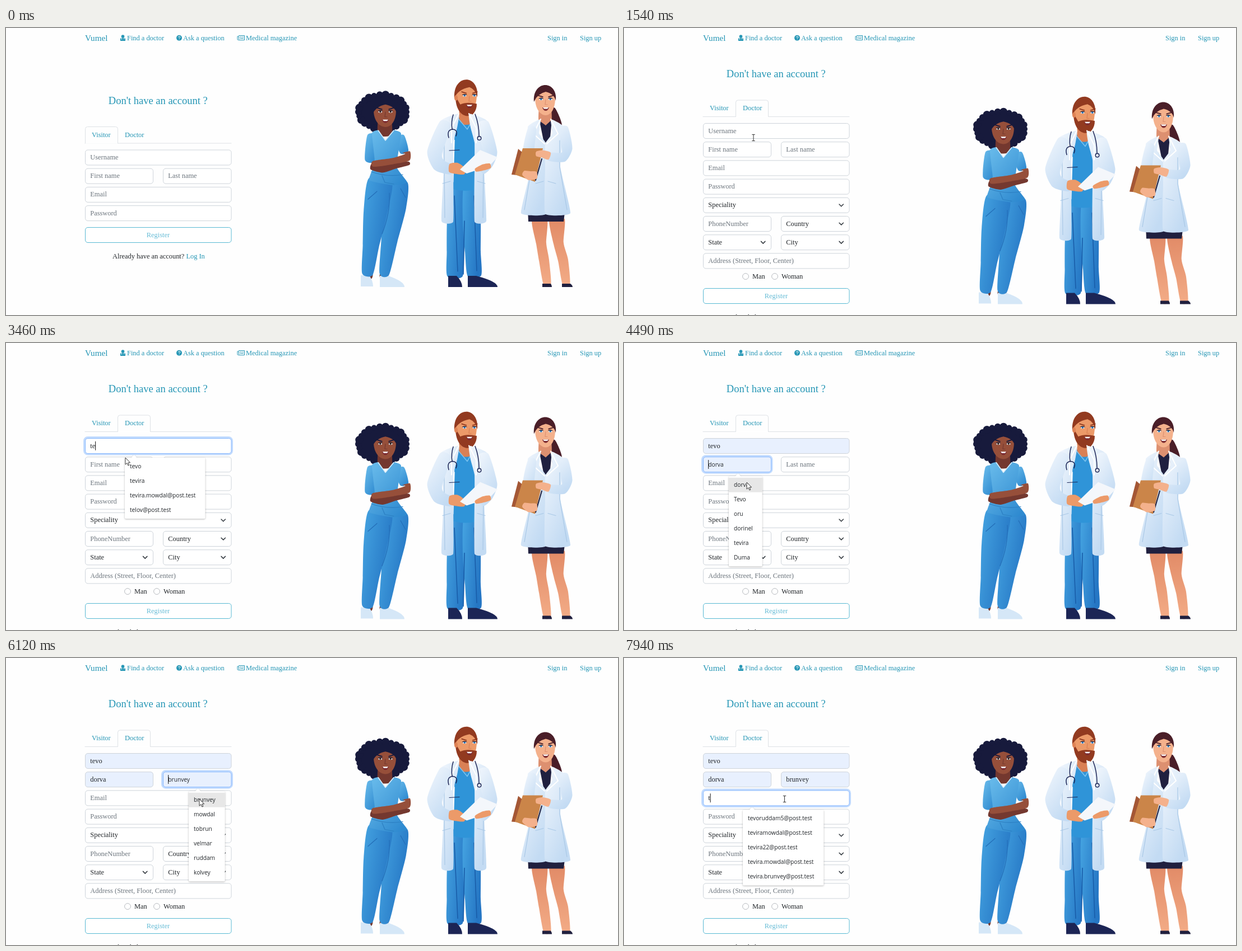
Animation of 1092 by 513 pixels, one loop 8000 ms. Source, as an HTML page:

```html
<!DOCTYPE html>
<html lang="en">
<head>
<meta charset="utf-8">
<title>Sign up</title>
<style>
html, body { margin: 0; width: 100%; height: 100%; overflow: hidden; background: #fefefe; }
svg { display: block; width: 1092px; height: 513px; }
text { font: 12.4px "Liberation Serif", serif; fill: #212529; white-space: pre; }
.teal text, text.teal { fill: #2596b5; }
text.hint { fill: #6c757d; }
text.sans { font: 10.2px "Open Sans", sans-serif; }
.mid { text-anchor: middle; }
.line { fill: none; stroke-linecap: round; stroke-linejoin: round; }
</style>
</head>
<body>
<svg viewBox="0 0 1092 513">
  <defs>
    <linearGradient id="scrub" x2=".8" y2="1"><stop stop-color="#6bbdec"/><stop offset="1" stop-color="#2f8ad0"/></linearGradient>
    <linearGradient id="legs" x2="1" y2=".5"><stop stop-color="#46a5e2"/><stop offset="1" stop-color="#2576c4"/></linearGradient>
    <linearGradient id="coat" x2=".6" y2="1"><stop stop-color="#f2f7fd"/><stop offset="1" stop-color="#c3dbf3"/></linearGradient>
    <linearGradient id="calf" x2="0" y2="1"><stop stop-color="#e18a66"/><stop offset="1" stop-color="#f3ac87"/></linearGradient>
  </defs>
  <g class="teal">
    <text x="141" y="23" style="font-size:15.2px">Vumel</text>
    <text x="216" y="22">Find a doctor</text>
    <text x="316" y="22">Ask a question</text>
    <text x="428" y="22">Medical magazine</text>
    <text x="966" y="22">Sign in</text>
    <text x="1024" y="22">Sign up</text>
    <path fill="#2596b5" d="M204 23v-3q0-2.500 3-2.500h3q3 0 3 2.500v3z"/>
    <circle cx="208.500" cy="15" r="2.800" fill="#2596b5"/>
    <circle cx="309" cy="17.700" r="5" fill="#2596b5"/>
    <path class="line" stroke="#fff" d="M206.600 18v2.500M210.700 18v2M307.300 16.400q.3-1.500 1.800-1.500 1.800 0 1.800 1.500 0 1-1.800 1.800v.5M309.100 20.800v.1"/>
    <path class="line" stroke="#2596b5" d="M415.500 13.500h10v8h-11q-1.500 0-1.500-1.500v-5h2.500v5M418 16h2M422 16h1.500M418 18.500h5.500"/>
  </g>
  <g id="people"></g>
  <g id="form">
    <text class="teal mid" x="271.300" y="88" style="font-size:18.500px">Don't have an account ?</text>
    <path class="line" stroke="#dee2e6" d="M141 158.500H402"/>
    <g id="tab">
      <path fill="#fefefe" stroke="#dee2e6" d="M0 158.500V133q0-4 4-4h50q4 0 4 4V158.500"/>
      <path stroke="#fefefe" stroke-width="1.500" d="M.5 158.500h57"/>
    </g>
    <g class="teal"><text x="153" y="147">Visitor</text><text x="212" y="147">Doctor</text></g>
    <g id="pane">
      <g id="base"></g>
      <g id="extra"></g>
      <g id="submit">
        <rect x="141.500" y=".5" width="260.500" height="27" rx="4.500" fill="#fff" stroke="#58b9d3"/>
        <text class="mid" x="271.500" y="17.500" style="fill:#67bcd6">Register</text>
        <text x="190" y="56">Already have an account? <tspan fill="#2596b5">Log In</tspan></text>
      </g>
    </g>
    <path id="wavy" class="line" stroke="#e0403a" stroke-width=".9"/>
    <rect id="caret" width="1" height="16" fill="#111"/>
  </g>
  <g id="menus"></g>
  <circle id="click" r="8.800" fill="#f6f21c" opacity=".72"/>
  <g id="cursor">
    <path id="arrow" d="M0 0V12.200L2.900 9.600 4.900 14 6.800 13.200 4.900 8.900H8.600Z" fill="#fff" stroke="#222" stroke-width=".9"/>
    <path id="beam" class="line" d="M-2.300-5.600H2.300M0-5.600V5.600M-2.300 5.600H2.300" stroke="#333"/>
    <path id="hand" d="M-1.500 0Q0-1.500 1.200 0V4.500L6 5.500Q8 6 7.700 8L6.800 12.500H.5L-3.800 7.500Q-3.500 5.500-1.500 7Z" fill="#fff" stroke="#222" stroke-width=".9"/>
  </g>
</svg>
<script>
const $ = id => document.getElementById(id);
const LOOP = 8000, NEVER = 9000, BLINK = 535;

function add(parent, tag, attrs, text) {
  const node = document.createElementNS('http://www.w3.org/2000/svg', tag);
  for (const k in attrs) node.setAttribute(k, attrs[k]);
  if (text) node.textContent = text;
  parent.appendChild(node);
  return node;
}
const show = (node, on) => { node.style.display = on ? '' : 'none'; };
const move = (node, x, y) => node.setAttribute('transform', `translate(${x} ${y})`);
const ramp = (t, a, b) => Math.min(1, Math.max(0, (t - a) / (b - a)));

// ---------- people ----------
const people = $('people');
const path = (fill, d) => add(people, 'path', { d, fill });
const line = (stroke, d, w = 1.2) => add(people, 'path', { d, class: 'line', stroke, 'stroke-width': w });
const oval = (fill, cx, cy, rx, ry = rx) => add(people, 'ellipse', { fill, cx, cy, rx, ry });
const both = draw => [-1, 1].forEach(draw);

// Smooth closed outline through a few points.
function shape(fill, p, k = .7) {
  const n = p.length, at = i => p[(i + n) % n];
  let d = 'M' + p[0];
  for (let i = 0; i < n; i++) {
    const a = at(i - 1), b = at(i), c = at(i + 1), e = at(i + 2);
    const out = b.map((v, j) => v + (c[j] - a[j]) * k / 6);
    const into = c.map((v, j) => v - (e[j] - b[j]) * k / 6);
    d += `C${out} ${into} ${c}`;
  }
  path(fill, d + 'Z');
}

// Tapered limb; each joint is x, y, width.
function limb(fill, ...joints) {
  const side = s => joints.map(([x, y, w], i) => {
    const a = joints[Math.max(0, i - 1)], b = joints[Math.min(joints.length - 1, i + 1)];
    const dx = b[0] - a[0], dy = b[1] - a[1], r = s * w / 2 / Math.hypot(dx, dy);
    return [x - dy * r, y + dx * r];
  });
  shape(fill, [...side(1), ...side(-1).reverse()]);
}

function shoe(fill, x0, x1, y, h) {
  path(fill, `M${x0} ${y}V${y - h}H${x0 + 15}Q${x1} ${y - h / 2} ${x1} ${y}Z`);
}

function head({ x, y, w, h, turn, skin, shade, hair, iris, beard }) {
  limb(shade, [x, y, w], [x, y + h * 1.6, w * 1.2]);
  path(skin, `M${x - w} ${y - h * .3}C${x - w} ${y - h * 1.3} ${x + w} ${y - h * 1.3} ${x + w} ${y - h * .3}
    C${x + w} ${y + h * .6} ${x + w * .5} ${y + h} ${x + turn} ${y + h}C${x - w * .5} ${y + h} ${x - w} ${y + h * .5} ${x - w} ${y - h * .3}Z`);
  if (beard) path(hair, `M${x - w} ${y - 4}C${x - w} ${y + h * 1.5} ${x + w} ${y + h * 1.5} ${x + w} ${y + h * .35}
    Q${x} ${y + h * .2} ${x - w * .55} ${y + h * .4}Z`);
  path(hair, `M${x - w - 2} ${y}C${x - w - 5} ${y - h * 1.65} ${x + w + 5} ${y - h * 1.65} ${x + w + 1} ${y - 2}
    Q${x + w * .9} ${y - h * .6} ${x + turn} ${y - h * .75}Q${x - w * .8} ${y - h * .6} ${x - w - 2} ${y}Z`);
  const fx = x + turn;
  both(s => {
    const ex = fx + s * w * .46, ey = y - h * .2;
    oval('#f4f4f6', ex, ey, 3.4, 2);
    oval(iris, ex, ey, 1.7, 1.9);
    line('#20182a', `M${ex - 3.5} ${ey - 1}Q${ex} ${ey - 3} ${ex + 3.5} ${ey - 1}`);
    line(hair, `M${ex - s * 3} ${ey - 4}L${ex + s * 5} ${ey - 6.500}`, 1.9);
  });
  line(shade, `M${fx} ${y - 4}l-1 9h4`);
  path('#7c2c32', `M${fx - 6} ${y + h * .42}h12q-2 6-6 6t-6-6z`);
  path('#fff', `M${fx - 5} ${y + h * .42}h10l-2 2.500h-6z`);
}

// Open coat: two mirrored front panels.
function coat({ x, top, waist, hem, shoulder, flare, gap, opening }) {
  both(s => {
    const at = (dx, y) => [x + s * dx, y];
    shape('url(#coat)', [at(9, top), at(shoulder, top + 14), at(shoulder - 6, waist), at(flare, hem),
      at(gap, hem + 1), at(gap, waist), at(gap, opening), at(12, top + 25)], .35);
    line('#fff', `M${at(9, top)}L${at(22, top + 26)}L${at(gap + 3, opening)}`, 2);
    line('#a9c8e6', `M${at(shoulder - 7, top + 38)}L${at(shoulder - 7, waist)}L${at(flare - 6, hem - 6)}M${at(gap + 5, waist + 26)}l${s * 14} 4`);
  });
}

function nurse() {
  const ink = '#171a3c', skin = '#964f3a', shade = '#74382f';
  oval(ink, 672, 149, 43, 32);
  for (let i = 0; i < 26; i++) {
    const a = i * Math.PI / 13;
    oval(ink, 672 + 43 * Math.cos(a), 150 + 31 * Math.sin(a), 5 + i * 7 % 3);
  }
  head({ x: 676, y: 154, w: 20, h: 23, turn: 1, skin, shade, hair: ink, iris: '#33201d' });
  limb(shade, [640, 441, 9], [653, 444, 9]);
  limb(shade, [668, 441, 9], [681, 444, 9]);
  shoe('#d5e7f7', 633, 655, 462, 20);
  shoe('#d5e7f7', 667, 711, 463, 20);
  limb('url(#legs)', [694, 275, 44], [693, 320, 42], [684, 380, 29], [675, 440, 17]);
  limb('url(#legs)', [668, 272, 42], [659, 330, 42], [651, 390, 29], [645, 440, 19]);
  line('#246eb8', 'M684 295Q686 330 671 368M646 306L662 292M704 287L713 303');
  limb('url(#scrub)', [654, 192, 18], [649, 237, 17]);
  limb('url(#scrub)', [702, 194, 17], [711, 222, 15]);
  shape('url(#scrub)', [[653, 188], [665, 183], [677, 200], [691, 183], [705, 189], [697, 248], [716, 276], [690, 281], [648, 272], [658, 240]], .4);
  line('#d8edfa', 'M664 183L677 201L692 183', 1.5);
  line('#2b7fc2', 'M652 257Q680 267 708 262M671 264L676 276L692 279');
  limb(shade, [652, 247, 12], [672, 252, 13], [696, 245, 12], [719, 242, 6]);
  limb(skin, [714, 222, 14], [716, 231, 14], [690, 238, 11], [655, 243, 10]);
}

function surgeon() {
  const navy = '#1c2555', skin = '#ec9a69', hair = '#923a20';
  limb('url(#legs)', [808, 280, 28], [803, 345, 32], [802, 400, 31], [801, 444, 27]);
  limb('url(#legs)', [830, 280, 26], [831, 345, 32], [833, 400, 28], [836, 443, 24]);
  shoe(navy, 789, 814, 463, 20);
  shoe(navy, 824, 877, 463, 20);
  line('#195da9', 'M800 300L806 435M835 300L840 434M818 345L816 440', 1.6);
  path('#2f94d8', 'M802 160L837 160L842 288Q820 294 798 288Z');
  head({ x: 821, y: 126, w: 19, h: 27, turn: 6, skin, shade: '#d98055', hair, iris: '#276fb2', beard: true });
  oval('#df8356', 803, 125, 3, 5);
  path('#2f94d8', 'M803 160L823 180L836 160L840 200H800Z');
  line('#7cc3ee', 'M807 162L823 181L834 162', 1.5);
  coat({ x: 817, top: 153, waist: 248, hem: 345, shoulder: 42, flare: 40, gap: 19, opening: 205 });
  limb('url(#coat)', [784, 170, 20], [765, 222, 27], [773, 245, 24], [796, 254, 16]);
  limb('url(#coat)', [851, 170, 20], [864, 222, 25], [860, 243, 18], [848, 256, 14]);
  limb(skin, [791, 250, 14], [804, 251, 20], [819, 257, 10]);
  path('#f4f7fb', 'M810 253L846 218L877 231L862 247L822 260Z');
  limb(skin, [864, 246, 8], [852, 249, 11], [838, 254, 6]);
  line(navy, 'M798 155Q794 167 796 181M790 196Q786 182 797 181Q807 182 803 193M837 154Q844 172 844 193', 1.5);
  oval(navy, 844.5, 197, 4);
  oval('#dfe7ef', 844.5, 197, 2.6);
  line(navy, 'M791 219L809 218');
}

function consultant() {
  const navy = '#20203f', skin = '#f4b18c', hair = '#4a1e28';
  limb('url(#calf)', [952, 342, 27], [955, 385, 18], [960, 415, 18], [966, 459, 13]);
  limb('url(#calf)', [983, 342, 27], [986, 385, 18], [994, 415, 18], [1000, 459, 13]);
  shoe(navy, 957, 974, 463, 6);
  shoe(navy, 992, 1011, 463, 6);
  path(navy, 'M931 322H998L995 346H932Z');
  limb(hair, [974, 145, 12], [983, 174, 18], [979, 200, 5]);
  head({ x: 962, y: 132, w: 18, h: 24, turn: 1, skin, shade: '#dd9070', hair, iris: '#246ca8' });
  path(navy, 'M952 166L963 174L974 164L970 206H960Z');
  coat({ x: 963, top: 163, waist: 248, hem: 331, shoulder: 32, flare: 44, gap: -1, opening: 207 });
  limb('url(#coat)', [939, 178, 14], [933, 215, 20], [938, 240, 16]);
  path('#a45735', 'M914 216L930 230L923 264L902 262Z');
  path('#cb8549', 'M922 215H958L944 275L908 262Z');
  line(navy, 'M956 234L945 272', 2);
  limb('url(#coat)', [995, 178, 15], [1001, 215, 19], [994, 231, 17], [968, 230, 14]);
  limb(skin, [970, 229, 13], [957, 225, 13], [946, 225, 8]);
  limb(skin, [923, 259, 8], [934, 264, 16], [947, 263, 12]);
}
nurse();
surgeon();
consultant();

// ---------- form ----------
const fields = {}, base = $('base'), extra = $('extra');
function field(group, id, x, row, w, label, select) {
  const y = 170 + 33.2 * row, f = { x, y, w, label };
  f.glow = add(group, 'rect', { x: x - 1, y: y - 1, width: w + 2, height: 29.5, rx: 6, fill: 'none', stroke: '#c2dbfe', 'stroke-width': 4, opacity: 0 });
  f.box = add(group, 'rect', { x: x + .5, y: y + .5, width: w - .5, height: 27, rx: 4.5, fill: '#fff', stroke: '#ced4da' });
  f.text = add(group, 'text', { x: x + 9.3, y: y + 17.5, class: select ? '' : 'hint' }, label);
  if (select) add(group, 'path', { d: `M${x + w - 18} ${y + 12.200}l3.700 3.700 3.700-3.700`, class: 'line', stroke: '#343a40', 'stroke-width': 1.5 });
  fields[id] = f;
}
const wide = (group, id, row, label, select) => field(group, id, 141, row, 261, label, select);
const left = (group, id, row, label, select) => field(group, id, 141, row, 121.5, label, select);
const right = (group, id, row, label, select) => field(group, id, 280, row, 122, label, select);
wide(base, 'user', 0, 'Username');
left(base, 'first', 1, 'First name');
right(base, 'last', 1, 'Last name');
wide(base, 'email', 2, 'Email');
wide(base, 'pass', 3, 'Password');
wide(extra, 'spec', 4, 'Speciality', true);
left(extra, 'phone', 5, 'PhoneNumber');
right(extra, 'country', 5, 'Country', true);
left(extra, 'state', 6, 'State', true);
right(extra, 'city', 6, 'City', true);
wide(extra, 'addr', 7, 'Address (Street, Floor, Center)');
['Man', 'Woman'].forEach((s, i) => {
  add(extra, 'circle', { cx: 217 + 52 * i, cy: 444, r: 5.4, fill: '#fff', stroke: '#b9bcc0' });
  add(extra, 'text', { x: 229 + 52 * i, y: 447.5 }, s);
});

// ---------- story ----------
const TAB = 1130, SWAP = TAB + 170;
const story = {
  user: { focus: 2010, leave: 4160, typed: [[2880, 't'], [3180, 'te']], hover: 3580, pick: 3640, value: 'tevo' },
  first: { focus: 4160, leave: 5720, typed: [], hover: 4400, pick: 5100, value: 'dorva' },
  last: { focus: 5720, leave: 6780, typed: [], hover: 6040, pick: 6330, value: 'brunvey' },
  email: { focus: 6780, leave: NEVER, typed: [[7870, 't']], hover: NEVER, pick: NEVER }
};
const clicks = [TAB, ...Object.values(story).flatMap(s => [s.focus, s.pick])];

// Pointer glides: start, end, x, y. It rests in between.
const glides = [
  [130, 410, 286, 269], [590, 1090, 230, 193], [1300, 1540, 231, 196], [1600, 2000, 226, 188],
  [3200, 3460, 213, 205], [3460, 3590, 221, 217], [4240, 4430, 219, 249], [5180, 5640, 312, 220],
  [5860, 6060, 345, 252], [6420, 6720, 286.5, 246], [7040, 7140, 286.5, 252]
];

const mail = s => s + '@post.test';
const names = ['tevo', 'tevira', mail('tevira.mowdal'), mail('telov')];
const menus = [];
function menu(id, items, from, cut) {
  const f = fields[id], s = story[id], x = f.x + (f.w > 200 ? 71 : 46), y = f.y + 35;
  const g = add($('menus'), 'g', {}), h = 26 * items.length + 5;
  g.style.filter = 'drop-shadow(0 1px 1.5px rgba(0,0,0,.28))';
  const back = add(g, 'rect', { x, y, height: h, rx: 2, fill: '#fff' });
  add(g, 'path', { d: `M${x + 11} ${y + .5}l5.500-5.500 5.500 5.500z`, fill: '#fff' });
  const bar = add(g, 'rect', { x, y: y + 2.5, height: 26, fill: '#e7e7e7' });
  const widths = items.map((item, i) =>
    add(g, 'text', { x: x + 9, y: y + 19 + 26 * i, class: 'sans' }, item).getComputedTextLength());
  const w = Math.max(...widths) + 26;
  back.setAttribute('width', w);
  bar.setAttribute('width', w);
  menus.push({ g, bar, x, y, w, h, from, hover: s.hover, out: cut || s.pick + 80, gone: cut ? cut + 1 : s.pick + 380 });
}
menu('user', [...names, mail('tevira.brunvey'), 'tobal'], 2890, 3180);
menu('user', names, 3130);
menu('first', ['dorva', 'Tevo', 'oru', 'dorinel', 'tevira', 'Duma'], 4270);
menu('last', ['brunvey', 'mowdal', 'tobrun', 'velmar', 'ruddam', 'kolvey'], 5860);
menu('email', ['tevoruddam5', 'teviramowdal', 'tevira22', 'tevira.mowdal', 'tevira.brunvey'].map(mail), 7885);

// ---------- update ----------
const formShift = t => t < SWAP ? 47.5 : 0;
const menuAlpha = (m, t) => ramp(t, m.from, m.from + 50) * (1 - ramp(t, m.out, m.gone));

function drawLayout(t) {
  const doctor = t >= SWAP;
  move($('form'), 0, formShift(t));
  move(people, 0, doctor ? 30.5 : 0);
  move($('submit'), 0, doctor ? 465 : 308.5);
  move($('tab'), t < TAB ? 141.5 : 199.5, 0);
  show(extra, doctor);
  $('pane').style.opacity = doctor ? ramp(t, SWAP, SWAP + 170) : 1 - ramp(t, TAB, SWAP);
}

function drawFields(t) {
  show($('caret'), false);
  for (const id in story) {
    const f = fields[id], s = story[id];
    const filled = t >= s.pick, preview = !filled && t >= s.hover;
    const [at, typed] = s.typed.filter(e => e[0] <= t).pop() || [0, ''];
    const value = filled || preview ? s.value : typed;
    const glow = ramp(t, s.focus + 70, s.focus + 140) - ramp(t, s.leave + 70, s.leave + 140);
    f.text.textContent = value || f.label;
    f.text.setAttribute('class', preview ? 'sans' : value ? '' : 'hint');
    f.box.setAttribute('fill', filled || preview ? '#e8f0fe' : '#fff');
    f.box.setAttribute('stroke', glow > .5 ? '#86b7fe' : '#ced4da');
    f.glow.setAttribute('opacity', glow);
    if (t < s.focus || t >= s.leave) continue;
    const since = Math.max(s.focus, at, filled ? s.pick : 0);
    const end = value && !preview ? f.text.getComputedTextLength() : 0;
    $('caret').setAttribute('x', f.x + 9.2 + end);
    $('caret').setAttribute('y', f.y + 5.8);
    show($('caret'), Math.floor((t - since) / BLINK) % 2 === 0);
    if (id === 'first' && filled) {
      $('wavy').setAttribute('d', 'M150.500 222' + 'l1.500-1.400 1.500 1.400'.repeat(end / 3));
    }
  }
  show($('wavy'), t >= story.first.pick && t < story.first.leave);
}

function drawMenus(t) {
  for (const m of menus) {
    const alpha = menuAlpha(m, t), s = .955 + .045 * alpha;
    show(m.g, alpha > 0);
    show(m.bar, t >= m.hover);
    m.g.style.opacity = alpha;
    m.g.setAttribute('transform', `translate(${(m.x + m.w / 2) * (1 - s)} ${(m.y + m.h / 2) * (1 - s)}) scale(${s})`);
  }
}

function pointerKind(t, x, y) {
  const inside = r => x >= r.x && x <= r.x + r.w && y >= r.y && y <= r.y + r.h;
  const dy = formShift(t);
  if (menus.some(m => menuAlpha(m, t) > .5 && inside(m))) return 'arrow';
  if (inside({ x: 141, y: 129 + dy, w: 117, h: 29 })) return 'hand';
  const over = Object.values(fields).some(f => inside({ x: f.x, y: f.y + dy, w: f.w, h: 27.5 }));
  return over ? 'beam' : 'arrow';
}

function drawCursor(t) {
  let x = 835, y = 439;
  for (const [from, to, tx, ty] of glides) {
    const u = ramp(t, from, to), e = u * u * (3 - 2 * u);
    x += (tx - x) * e;
    y += (ty - y) * e;
  }
  const kind = pointerKind(t, x, y);
  for (const k of ['arrow', 'beam', 'hand']) show($(k), k === kind);
  show($('cursor'), t >= glides[0][0]);
  show($('click'), clicks.some(c => t >= c - 50 && t < c + 110));
  move($('cursor'), x, y);
  move($('click'), x, y);
}

function frame() {
  const t = performance.now() % LOOP;
  drawLayout(t);
  drawFields(t);
  drawMenus(t);
  drawCursor(t);
  requestAnimationFrame(frame);
}
frame();
</script>
</body>
</html>
```
